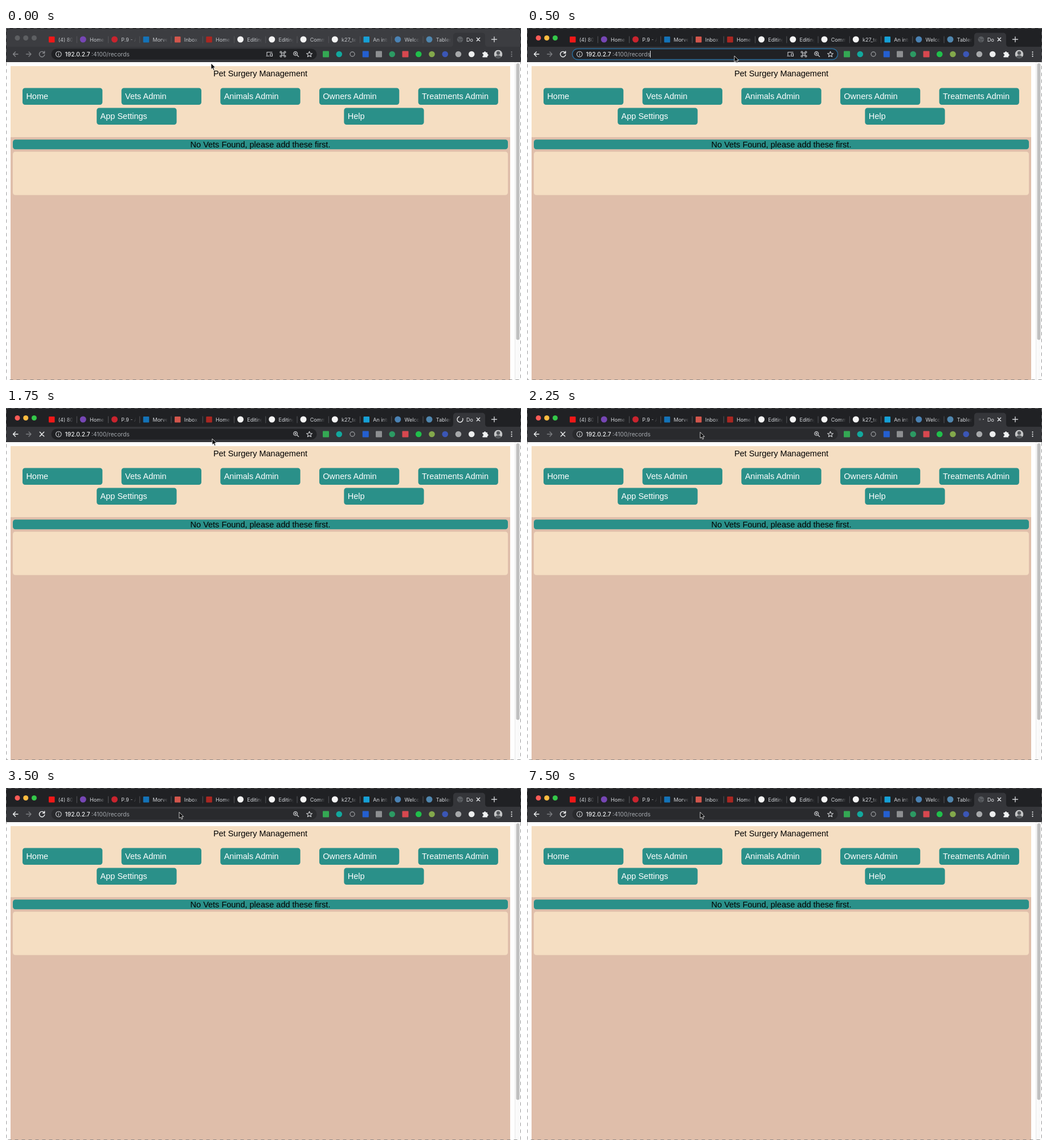
Recreate the animation shown at these times as an HTML page. Size 904x619 px, loop 8 s.

```html
<!DOCTYPE html>
<html lang="en">
<head>
<meta charset="utf-8">
<style>
html, body { margin: 0; width: 100%; height: 100%; overflow: hidden; background: #fff; }
svg { display: block; }
.page { font: 14.5px "Liberation Sans", Arial, sans-serif; }
.ui { font: 9px Inter, sans-serif; }
.url { font-size: 10.2px; }
.line { fill: none; stroke-width: 1.4; stroke-linecap: round; stroke-linejoin: round; }
</style>
</head>
<body>
<svg width="904" height="619" viewBox="0 0 904 619">
  <defs>
    <linearGradient id="fade" gradientUnits="userSpaceOnUse" x1="107" x2="118" y1="0" y2="0">
      <stop class="tint"/><stop class="tint" offset="1" stop-opacity="0"/>
    </linearGradient>
    <clipPath id="face"><circle cx="864" cy="46" r="7.5"/></clipPath>
  </defs>
  <rect width="904" height="619" fill="#fff"/>
  <rect width="904" height="60" fill="#2a2b2d"/>
  <path id="strip" d="M1 34V7Q1 2 6 2H898Q903 2 903 7V34Z"/>
  <rect x="1" y="33" width="902" height="26.5" fill="#35363a"/>
  <path d="M780 33Q785 33 785 28V14Q785 8.500 790.500 8.500H835.500Q841 8.500 841 14V28Q841 33 846 33Z" fill="#35363a"/>
  <g id="lights"></g>
  <g id="tabs" class="ui"></g>
  <g id="globe"><circle cx="797" cy="20" r="5.300" fill="#5c5f63"/><path d="M793 18l4 3 4-1M795 23l3 1" class="line" stroke="#46484c"/></g>
  <g id="dots"><circle cx="795" cy="20" r="2.200" fill="#4f5155"/><circle cx="801" cy="20" r="1" fill="#aaa"/></g>
  <path id="spin" class="line" stroke="#eceded"/>
  <text class="ui" x="808" y="23.500" fill="#e8eaed">Do</text>
  <path class="line" stroke="#e8eaed" d="M826.300 17.300l5.400 5.400m0-5.400l-5.400 5.400"/>
  <path class="line" stroke="#d0d2d5" d="M852.500 20h9m-4.500-4.500v9"/>

  <g class="line">
    <g class="nav">
      <path d="M21 46H12.500M16.500 42l-4 4 4 4"/>
      <path id="reload" d="M67 43.300A4.700 4.700 0 1 0 67.800 47M67.700 41v3.300h-3.300"/>
      <path id="stop" d="M59.300 42.300l7.400 7.400m0-7.400l-7.400 7.400"/>
    </g>
    <path stroke="#7b7d81" d="M35.500 46H44M40 42l4 4-4 4"/>
  </g>
  <rect id="omni" x="79.500" y="36.500" width="466" height="19" rx="9.500" stroke-width="1.500"/>
  <g class="line" stroke="#d0d2d5" style="stroke-width:1.1">
    <path d="M87.500 46a4.800 4.800 0 1 0 9.600 0a4.800 4.800 0 1 0-9.600 0M92.300 45.500v3M92.300 43.300v.1"/>
    <path id="cast" d="M458 48V42.500h9M457 49.300h5M464 45h3.500v4.500H464z"/>
    <path id="knot" d="M484 44h4v4h-4zM484 44h-1.500a1.500 1.500 0 1 1 1.500-1.500zM488 44v-1.500a1.500 1.500 0 1 1 1.500 1.500zM484 48v1.500a1.500 1.500 0 1 1-1.500-1.500zM488 48h1.500a1.500 1.500 0 1 1-1.500 1.500z"/>
    <path d="M504.700 45a3.400 3.400 0 1 0 6.800 0a3.400 3.400 0 1 0-6.800 0M510.700 47.500l3 3M506.700 45h2.800M508.100 43.600v2.800"/>
    <path d="M532.500 41.300l1.400 3.200 3.500.3-2.700 2.300.9 3.500-3.100-1.900-3.100 1.900.9-3.500-2.700-2.300 3.500-.3z"/>
  </g>
  <g class="ui url">
    <text x="103.500" y="49.500" fill="#f1f3f4" font-weight="500">192.0.2.7</text>
    <text x="150" y="49.500" fill="#a5a9ae">:4100/records</text>
  </g>
  <path id="caret" d="M216.500 40v12" stroke="#dfe1e4"/>
  <g id="exts"></g>
  <path fill="#f1f3f4" d="M836.500 43h2.500a1.700 1.700 0 0 1 3.400 0h2.600v2.800a1.700 1.700 0 0 1 0 3.400v2.300h-8.500v-2.500a1.600 1.600 0 0 0 0-3.200z"/>
  <g clip-path="url(#face)"><circle cx="864" cy="46" r="7.500" fill="#c4c5c6"/><circle cx="864" cy="44" r="3.200" fill="#55585b"/><ellipse cx="864" cy="53" rx="6" ry="5" fill="#55585b"/></g>
  <g class="menu"><circle cx="887.500" cy="42.300" r="1.100"/><circle cx="887.500" cy="46" r="1.100"/><circle cx="887.500" cy="49.700" r="1.100"/></g>

  <rect x="8" y="67" width="877" height="125" fill="#f5dec2"/>
  <rect x="8" y="192" width="877" height="427" fill="#dfbeaa"/>
  <g id="page" class="page"></g>
  <rect x="893" y="60" width="10" height="559" fill="#fafafa"/>
  <path d="M893.500 60v559" stroke="#e7e7e7"/>
  <rect x="895.500" y="62" width="6" height="486.500" rx="3" fill="#c0c0c0"/>
  <rect id="edge" x=".5" y=".5" width="903" height="618" fill="none" stroke="#77787a" stroke-opacity=".75" stroke-dasharray="6 6"/>
  <path id="mouse" d="M0 0V10.700L2.500 8.500 4.200 12.400 6 11.600 4.400 7.800H7.600Z" fill="#000" stroke="#fff" stroke-width=".8"/>
</svg>
<script>
const $ = id => document.getElementById(id);
const all = q => document.querySelectorAll(q);
const box = (x, y, w, h, r, fill) => `<rect x="${x}" y="${y}" width="${w}" height="${h}" rx="${r}" fill="${fill}"/>`;
const dot = (x, y, r, fill) => `<circle cx="${x}" cy="${y}" r="${r}" fill="${fill}"/>`;
const show = (id, on) => $(id).setAttribute('visibility', on ? 'visible' : 'hidden');
const set = (id, name, value) => $(id).setAttribute(name, value);

// label, icon colour, round icon
const tabs = [
  ['(4) 80', '#f01818'], ['Home', '#7646b4', 1], ['P.9 - A', '#c9242e', 1], ['Morvel', '#1473b8'],
  ['Inbox (', '#d2564c'], ['Home', '#a92722'], ['Editing', '#f4f4f4', 1], ['Editing', '#f4f4f4', 1],
  ['Commi', '#f4f4f4', 1], ['k27_te', '#f4f4f4', 1], ['An intr', '#16a0d6'], ['Welcor', '#4a82b4', 1],
  ['Tablen', '#4f86ae', 1]
];
$('tabs').innerHTML = tabs.map(([label, fill, round], i) =>
  `<g transform="translate(${i * 55.25})">` +
  (round ? dot(80, 20, 5.5, fill) : box(75, 15, 10.5, 10.5, 1, fill)) +
  `<text x="91.800" y="23.500" fill="url(#fade)">${label}</text>` +
  (i < 12 ? '<path d="M124.300 14.500v12" stroke="#55575b"/>' : '') + '</g>').join('');

const exts = [
  ['#34a853'], ['#12a89d', 1], ['#8f9194', 2], ['#245fd0'], ['#8d8f91'], ['#2c9a63', 1], ['#d8484f'],
  ['#20bf4b', 1], ['#83a84b', 1], ['#3b56b5', 1], ['#a6a8aa', 1], ['#eceded', 1]
];
$('exts').innerHTML = exts.map(([fill, kind], i) => {
  const x = 561.5 + i * 23.25;
  if (kind === 2) return `<circle cx="${x}" cy="46" r="4" class="line" stroke="${fill}"/>`;
  return kind ? dot(x, 46, 5.3, fill) : box(x - 5.5, 40.5, 11, 11, 1, fill);
}).join('');

const teal = '#2a9089';
const button = (x, y, label) => box(x, y, 140.3, 29.6, 4.5, teal) +
  `<text x="${x + 6.4}" y="${y + 19.7}" fill="#fff">${label}</text>`;
const title = (y, label) => `<text x="446.500" y="${y}" text-anchor="middle">${label}</text>`;
$('page').innerHTML = title(84.5, 'Pet Surgery Management') +
  ['Home', 'Vets Admin', 'Animals Admin', 'Owners Admin', 'Treatments Admin']
    .map((label, i) => button(29 + i * 173.65, 105.5, label)).join('') +
  button(159.2, 140.5, 'App Settings') + button(593.3, 140.5, 'Help') +
  box(12, 196.3, 869, 17, 4.5, teal) + title(209.7, 'No Vets Found, please add these first.') +
  box(12, 217.5, 869, 76.3, 4.5, '#f5dec2');

// Each step keeps the earlier values it does not override.
const steps = [
  { at: 0, mouse: [360, 62], focus: 0, ring: 0, hover: 0, load: 0, cast: 1, knot: 1, icon: 'globe', ants: 0 },
  { at: 250, mouse: [364, 49], ants: 3 },
  { at: 500, focus: 1, ring: 1 },
  { at: 750, ring: 0, hover: 1, load: 1, cast: 0, icon: [-14, 0] },
  { at: 1000, icon: [-90, 0] },
  { at: 1250, knot: 0, icon: [-200, 0] },
  { at: 1500, icon: [-330, -70] },
  { at: 1750, mouse: [362, 54], hover: 0, icon: [-290, -15] },
  { at: 2000, mouse: [333, 48], hover: 1, icon: [-180, 0], ants: 6 },
  { at: 2250, mouse: [304, 42.5], icon: 'dots', ants: 9 },
  { at: 2500, ring: 1, load: 0, cast: 1, knot: 1, icon: 'globe' },
  { at: 2750, ring: 0, load: 1, cast: 0, icon: [-14, 0] },
  { at: 3000, knot: 0, icon: [-90, 0] },
  { at: 3250, load: 0, icon: 'globe' },
  { at: 7500, ants: 12 }
];

function arc(from, to) {
  const point = a => {
    const r = a * Math.PI / 180;
    return `${797 + 5 * Math.sin(r)} ${20 - 5 * Math.cos(r)}`;
  };
  return `M${point(from)}A5 5 0 ${to - from > 180 ? 1 : 0} 1 ${point(to)}`;
}

function draw(t) {
  const s = Object.assign({}, ...steps.filter(step => step.at <= t));
  const spinning = Array.isArray(s.icon);
  set('mouse', 'transform', `translate(${s.mouse})`);
  set('strip', 'fill', s.focus ? '#202124' : '#3c3d41');
  set('omni', 'fill', s.ring || !s.hover ? '#202124' : '#292a2d');
  set('omni', 'stroke', s.ring ? '#2a6d9b' : 'none');
  set('edge', 'stroke-dashoffset', s.ants);
  $('lights').innerHTML = ['#fc5b57', '#fdbc40', '#34c84a']
    .map((c, i) => dot(20 + i * 14.7, 17.5, 4.5, s.focus ? c : '#5d5f62')).join('');
  all('.tint').forEach(e => e.setAttribute('stop-color', s.focus ? '#d5d8dc' : '#c2c5c9'));
  all('.nav').forEach(e => e.setAttribute('stroke', s.focus ? '#f1f3f4' : '#85878b'));
  all('.menu').forEach(e => e.setAttribute('fill', s.focus ? '#f1f3f4' : '#85878b'));
  show('caret', s.ring);
  show('reload', !s.load);
  show('stop', s.load);
  show('cast', s.cast);
  show('knot', s.knot);
  show('globe', s.icon === 'globe');
  show('dots', s.icon === 'dots');
  show('spin', spinning);
  if (spinning) set('spin', 'd', arc(...s.icon));
}

let begin;
function tick(now) {
  begin ??= now;
  draw((now - begin) % 8000);
  requestAnimationFrame(tick);
}
draw(0);
requestAnimationFrame(tick);
</script>
</body>
</html>
```
